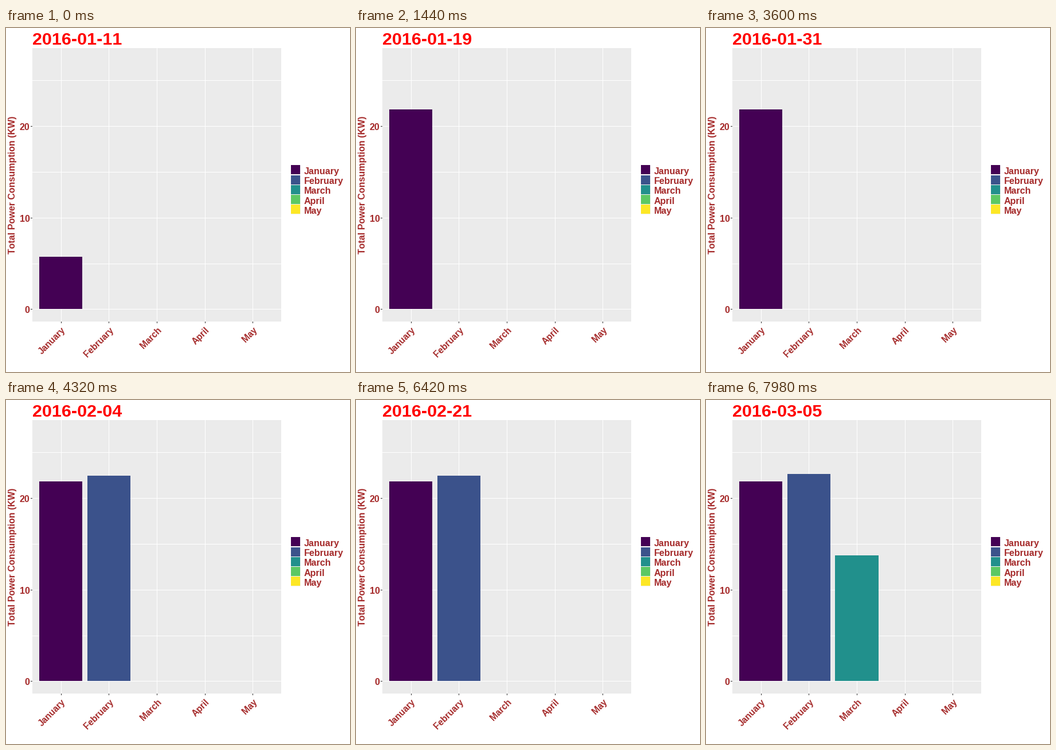
These frames come from a looping animation (600 by 600 pixels, 8000 ms). A matplotlib script:

```python
import numpy as np
import matplotlib.pyplot as plt
from matplotlib.animation import FuncAnimation
from matplotlib.patches import Rectangle

SIZE, DPI = 600, 100
LOOP, STEP = 8000, 20
BROWN = "#A52A2A"
MONTHS = ["January", "February", "March", "April", "May"]
COLORS = ["#440154", "#3B528B", "#21908C", "#5DC863", "#FDE725"]
CENTERS = [96, 179, 263, 347, 430]
BASE = 490

# Each bar: left, right, then (start time in ms, top edge); a new daily maximum raises it.
BARS = [
    (58, 133, [(0, 399), (120, 293), (300, 266), (480, 142)]),
    (142, 217, [(3720, 132), (6960, 129)]),
    (225, 301, [(7440, 300), (7560, 277), (7800, 271)]),
]

plt.rcParams["font.family"] = "Liberation Sans"
plt.rcParams["font.weight"] = "bold"
plt.rcParams["text.kerning_factor"] = 6  # digits and letters keep their plain advance

fig = plt.figure(figsize=(SIZE / DPI, SIZE / DPI), dpi=DPI, facecolor="white")
ax = fig.add_axes([0, 0, 1, 1])
ax.set_xlim(0, SIZE)
ax.set_ylim(SIZE, 0)
ax.axis("off")


def box(x0, y0, x1, y1, color, z=1):
    return ax.add_patch(Rectangle((x0, y0), x1 - x0, y1 - y0, facecolor=color,
                                  linewidth=0, antialiased=False, zorder=z))


def label(x, y, text, px=16, color=BROWN, **kw):
    return ax.text(x, y, text, fontsize=px * 72 / DPI, color=color,
                   va="baseline", rotation_mode="anchor", **kw)


# Panel, grid and ticks
box(46, 35, 480, 512, "#EBEBEB")
for y in (91, 171, 251, 331, 411, 490):
    box(46, y, 480, y + 1, "white", 2)
for x in CENTERS:
    box(x, 35, x + 1, 512, "white", 2)
    box(x, 512, x + 1, 515, "#333333", 2)
for y, value in ((490, 0), (331, 10), (171, 20)):
    box(43, y, 46, y + 1, "#333333", 2)
    label(41.5, y + 7, str(value), ha="right")

# Axis labels
for i, month in enumerate(MONTHS):
    label(105 + 83.46 * i, 528, month, px=15.5, ha="right", rotation=45)
label(16, 273.3, "Total Power Consumption (KW)", ha="center", rotation=90)

# Legend
for i, (month, color) in enumerate(zip(MONTHS, COLORS)):
    top = round(239.3 + 17.28 * i)
    box(497, top, 514, top + 17, "#F2F2F2")
    box(497, top, 513, top + 16, color, 2)
    label(519.5, round(254.8 + 17.28 * i), month)

title = label(46, 29, "", px=30.5, color="red")
bars = [box(x0, BASE, x1, BASE, color, 3)
        for (x0, x1, _), color in zip(BARS, COLORS)]


def day_at(t):
    return t // 180 if t < 4500 else 25 + (t - 4500) // 120


def draw(frame):
    t = frame * STEP
    title.set_text(str(np.datetime64("2016-01-11") + day_at(t)))
    for bar, (_, _, steps) in zip(bars, BARS):
        top = min([y for start, y in steps if start <= t], default=BASE)
        bar.set_y(top)
        bar.set_height(BASE - top)
        bar.set_visible(top < BASE)
    return [title, *bars]


anim = FuncAnimation(fig, draw, frames=LOOP // STEP, interval=STEP,
                     init_func=lambda: draw(0), repeat=True, repeat_delay=0)
plt.show()
```
